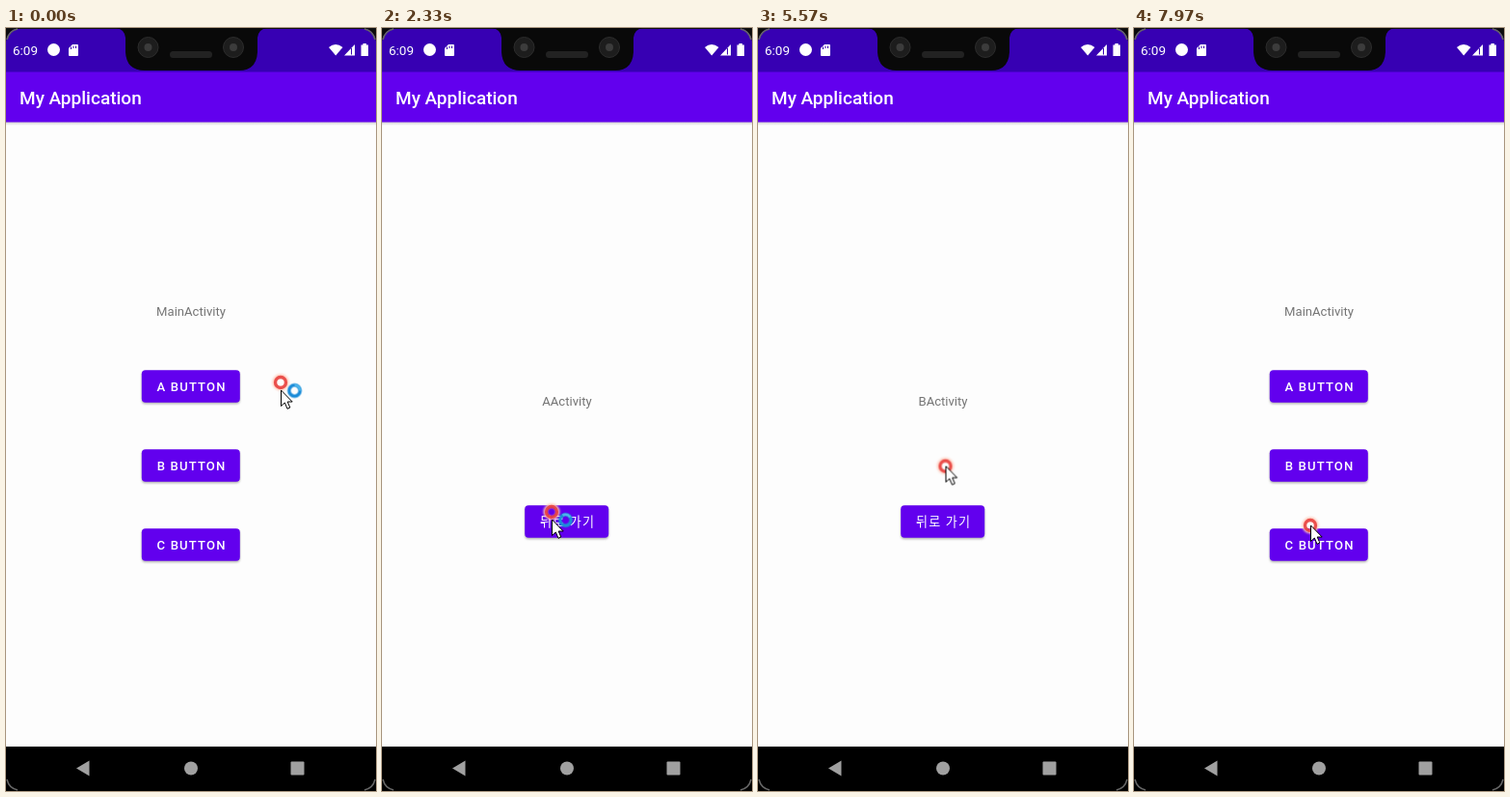
Animation of 384 by 790 pixels, one loop 8000 ms. Source, as an HTML page:

```html
<!DOCTYPE html>
<html lang="ko">
<head>
<meta charset="utf-8">
<title>Activity navigation</title>
<style>
  html, body { margin: 0; width: 100%; height: 100%; overflow: hidden; background: #000; }
  svg { display: block; width: 100vw; height: 100vh; }
  text { font-family: Roboto, "Noto Sans CJK KR", "Noto Sans CJK", sans-serif; fill: #fff; }
  .screen { transform-origin: 192px 395px; }
  .title { font-size: 19px; font-weight: 500; }
  .label { font-size: 13.1px; fill: #757575; text-anchor: middle; }
  .button { font-size: 13.1px; font-weight: 500; letter-spacing: 1.17px; text-anchor: middle; }
  .clock { font-size: 13.5px; }
  .blend { mix-blend-mode: multiply; }
</style>
</head>
<body>
<svg viewBox="0 0 384 790" preserveAspectRatio="none">
  <defs>
    <filter id="soft" x="-30%" y="-60%" width="160%" height="220%"><feGaussianBlur stdDeviation="1.2"/></filter>
    <filter id="wide" x="-40%" y="-80%" width="180%" height="260%"><feGaussianBlur stdDeviation="3"/></filter>
    <linearGradient id="edge" x2="0" y2="1">
      <stop stop-color="#777" stop-opacity=".35"/><stop offset="1" stop-color="#777" stop-opacity="0"/>
    </linearGradient>
  </defs>

  <g id="screens"></g>

  <g id="system">
    <path d="M0 0H14Q2 1 0 14ZM384 0H370Q382 1 384 14Z" fill="#0c0c0c"/>
    <path d="M0 .5H384" stroke="#111"/>
    <path d="M1 12Q3 3 12 1M383 12Q381 3 372 1M1 778Q3 787 12 789M383 778Q381 787 372 789" fill="none" stroke="#666" stroke-width="1.5"/>
    <path d="M114 0Q123 1 124 10V25Q125 44 144 44H242Q260 44 261 25V10Q262 1 271 0Z" fill="#090909"/>
    <g fill="#1d1d1d" stroke="#2c2c2c">
      <circle cx="147.5" cy="20" r="10.5"/><circle cx="236" cy="20" r="10.5"/>
    </g>
    <g fill="#3c3c3c"><circle cx="147.5" cy="20" r="4"/><circle cx="236" cy="20" r="4"/></g>
    <rect x="170" y="24" width="44" height="7" rx="3.5" fill="#222"/>
    <text class="clock" x="7" y="28">6:09</text>
    <g fill="#fff">
      <circle cx="49.5" cy="22.5" r="6.5"/>
      <path d="M69 17H74Q75 17 75 18V28Q75 29 74 29H66Q65 29 65 28V21Z"/>
      <path d="M335 20Q342 14 349.500 20L342.200 28.500Z"/>
      <path d="M351 28.500L362 17V28.500Z"/>
      <path d="M370.500 16H374V17.500H376V29H368.500V17.500H370.500Z"/>
    </g>
    <path d="M67.500 19.500V22M70 18.500V21M72.500 18.500V21M358.500 21V27.500" stroke="#3700b3" fill="none"/>
    <g fill="#a0a0a0">
      <path d="M73 766.500L86.500 758.500V774.500Z"/>
      <circle cx="192" cy="766.500" r="7"/>
      <rect x="295.500" y="759.500" width="14" height="14" rx="1"/>
    </g>
  </g>

  <g id="pointer">
    <g id="idle" fill="none">
      <circle class="blend" r="6.5" stroke="#ffc4b4" stroke-width="4" filter="url(#soft)"/>
      <circle r="5.5" stroke="#e42c2c" stroke-width="3.300" opacity=".78"/>
    </g>
    <g id="clicked" fill="none">
      <circle r="10" stroke="#8ae4fc" stroke-width="6.500" filter="url(#soft)"/>
      <circle r="8.500" stroke="#38bcec" stroke-width="3.500"/>
    </g>
    <g id="busy" fill="none">
      <g transform="translate(14.500 8.500)">
        <circle r="5.700" stroke="#1c8cd8" stroke-width="3.600"/>
        <path id="spin" d="M0 -5.700A5.700 5.700 0 0 1 5.700 0" stroke="#50b8ec" stroke-width="2.400"/>
      </g>
    </g>
    <path id="arrow" d="M.5 0V16.500L4.300 13L7 19.300L9.800 18L7.200 12H12.200Z" fill="#fff" stroke="#000"/>
  </g>
</svg>

<script>
const LOOP = 8000;
const OPEN = 400;
const $ = id => document.getElementById(id);

// Rows are [ms, styles, easing]; the end values are held to both ends of the loop.
function loop(el, rows, easing = 'linear') {
  const all = [[0, rows[0][1]], ...rows, [LOOP, rows.at(-1)[1]]];
  el.animate(all.map(([ms, style, ease = easing]) => ({ ...style, offset: ms / LOOP, easing: ease })),
    { duration: LOOP, iterations: Infinity });
}

const visibleBetween = (el, spans) => loop(el, [[0, { opacity: 0 }],
  ...spans.flatMap(([a, b]) => [[a, { opacity: 1 }], [b, { opacity: 0 }]])], 'step-end');

// Two-part "fast out, extra slow in" curve
const FAST = 'cubic-bezier(.3,0,.8,.15)';
const SLOW = 'cubic-bezier(.05,.7,.1,1)';
const grow = (at, from, to, style) => [
  [at, style(from), FAST],
  [at + OPEN / 6, style(from + (to - from) * .4), SLOW],
  [at + OPEN, style(to)]
];

const screens = [
  { name: 'Main', at: 0, press: 0, click: 1050 },
  { name: 'A', at: 1200, press: 0, click: 3250 },
  { name: 'Main', at: 3384, press: 1, click: 4960 },
  { name: 'B', at: 5110, press: 0, click: 6690 },
  { name: 'Main', at: 6830 }
];

const button = (text, x, y, w) => `
  <rect x="${x}" y="${y + 1.5}" width="${w}" height="33.6" rx="4" fill="#666" opacity=".5" filter="url(#soft)"/>
  <rect class="lift" x="${x}" y="${y + 4}" width="${w}" height="33.6" rx="4" fill="#777" opacity="0" filter="url(#wide)"/>
  <rect x="${x}" y="${y}" width="${w}" height="33.6" rx="4" fill="#6200ee"/>
  <rect class="ripple" x="${x}" y="${y}" width="${w}" height="33.6" rx="4" fill="#fff" opacity="0"/>
  <text class="button" x="192.6" y="${y + 21.8}">${text}</text>`;

function screenMarkup({ name }) {
  const main = name === 'Main';
  const buttons = main
    ? ['A', 'B', 'C'].map((c, i) => button(c + ' BUTTON', 140.8, 354.2 + i * 82, 102)).join('')
    : button('뒤로 가기', 148.2, 494.2, 87);
  return `
    <rect y="40" width="384" height="704" fill="#fdfdfd"/>
    <rect y="97" width="384" height="4" fill="url(#edge)"/>
    <rect width="384" height="46" fill="#3700b3"/>
    <rect y="45.5" width="384" height="52" fill="#6200ee"/>
    <text class="title" x="14" y="79">My Application</text>
    <text class="label" x="192" y="${main ? 298 : 391}">${name}Activity</text>
    ${buttons}
    <rect y="744" width="384" height="46"/>
    <rect class="shade" width="384" height="790" opacity="0"/>`;
}

screens.forEach((screen, i) => {
  const g = document.createElementNS('http://www.w3.org/2000/svg', 'g');
  g.setAttribute('class', 'screen');
  g.innerHTML = screenMarkup(screen);
  $('screens').append(g);

  const scale = s => ({ transform: `scale(${s})` });
  const next = screens[i + 1];
  const { at, click, press } = screen;
  const moves = i ? grow(at, .85, 1, scale) : [];
  if (i) loop(g, [[at + 40, { opacity: 0 }], [at + 106, { opacity: 1 }]]);
  if (next) {
    moves.push(...grow(next.at, 1, 1.05, scale));
    loop(g.querySelector('.shade'), grow(next.at, 0, .15, opacity => ({ opacity })));
    const flash = (cls, peak) => loop(g.querySelectorAll(cls)[press], [
      [click, { opacity: 0 }], [click + 60, { opacity: peak }],
      [click + 170, { opacity: peak }], [click + 400, { opacity: 0 }]
    ]);
    flash('.ripple', .24);
    flash('.lift', .3);
  }
  loop(g, moves);
});

const path = [
  [0, 285, 367], [60, 285, 367], [650, 199, 359], [1500, 199, 359],
  [2250, 176, 501], [2650, 176, 501], [3000, 185, 503], [3750, 185, 503],
  [4500, 195, 451], [5450, 195, 451], [6250, 184, 507], [7200, 184, 507],
  [7750, 183, 515]
];
loop($('pointer'), path.map(([ms, x, y]) => [ms, { transform: `translate(${x}px, ${y}px)` }]), 'ease-in-out');

const clicks = screens.filter(s => s.click).map(s => [s.click, s.click + 130]);
visibleBetween($('clicked'), clicks);
loop($('idle'), [[0, { opacity: 1 }],
  ...clicks.flatMap(([a, b]) => [[a, { opacity: 0 }], [b, { opacity: 1 }]])], 'step-end');

const BUSY_END = 4200;
visibleBetween($('busy'), [[0, BUSY_END]]);
loop($('arrow'), [[0, { transform: 'translate(0px, 8px)' }],
  [BUSY_END, { transform: 'translate(0px, 0px)' }]], 'step-end');
$('spin').animate({ transform: ['rotate(0deg)', 'rotate(360deg)'] }, { duration: 800, iterations: Infinity });
</script>
</body>
</html>
```
